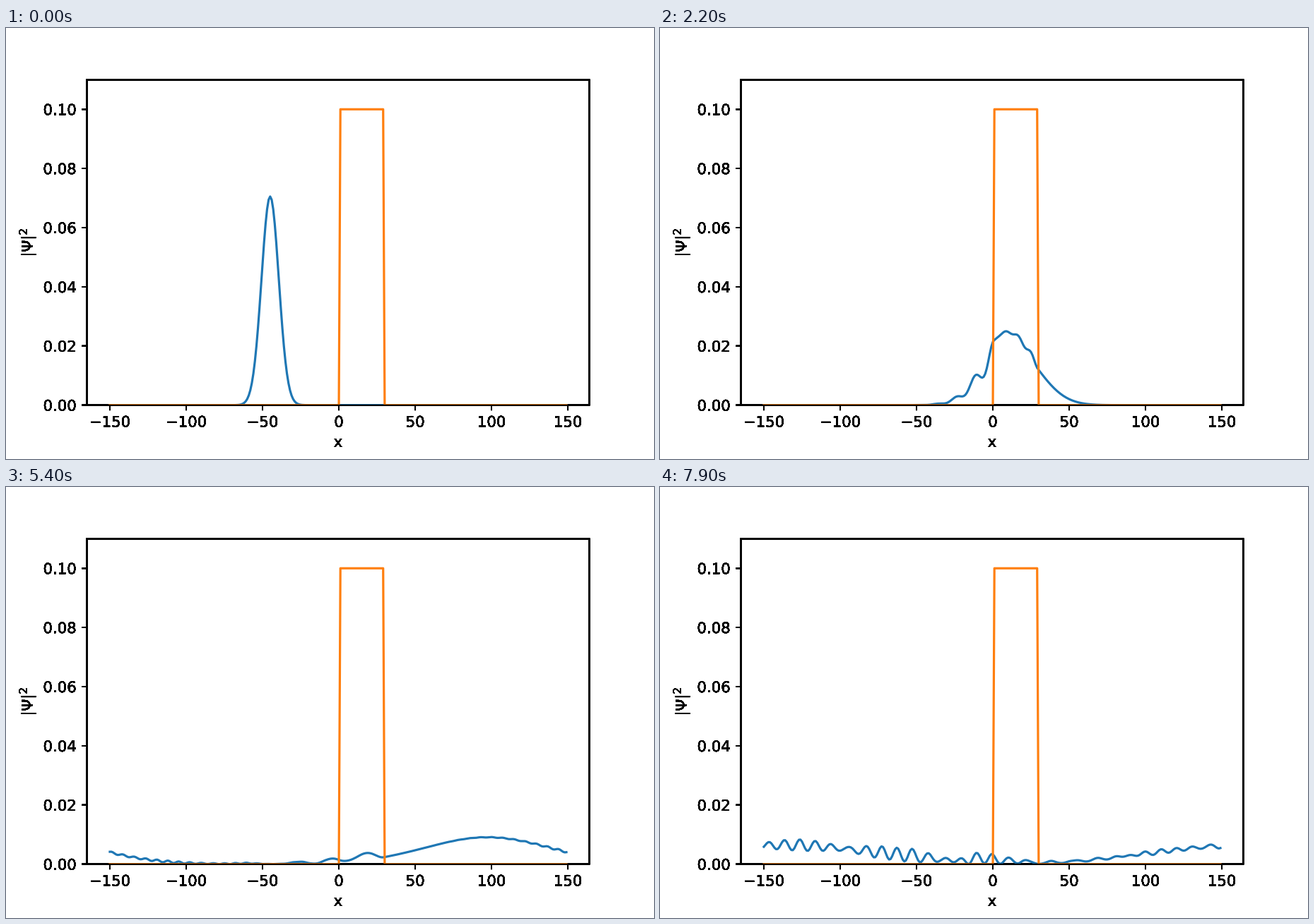
Recreate the animation shown at these times as a matplotlib script. Size 917 by 611 pixels, loop 8 s.

```python
import numpy as np
import matplotlib.pyplot as plt
from matplotlib.animation import FuncAnimation
from matplotlib.patches import Rectangle
from matplotlib.patheffects import Stroke

W, H = 917, 611
DPI = W / 6
FRAMES, INTERVAL = 80, 100

# Wave packet and barrier, in units where hbar = m = 1
X0, WIDTH, K0 = -45, 8, np.pi / 10
HEIGHT = 0.0118
DT = 8.45

plt.rcParams.update({
    "font.family": "DejaVu Sans",
    "font.size": 10,
    "path.snap": False,
})

x = np.arange(-150, 150)
inside = (x > 0) & (x < 30)


def hamiltonian():
    """Spectral kinetic energy on a periodic grid plus the barrier."""
    k = 2 * np.pi * np.fft.fftfreq(x.size)
    waves = np.fft.fft(np.eye(x.size), axis=0)
    kinetic = np.fft.ifft(k[:, None] ** 2 / 2 * waves, axis=0).real
    return (kinetic + kinetic.T) / 2 + np.diag(HEIGHT * inside)


psi0 = np.exp(-(x - X0) ** 2 / (2 * WIDTH ** 2) + 1j * K0 * x)
psi0 /= np.linalg.norm(psi0)
energy, modes = np.linalg.eigh(hamiltonian())
coef = modes.T @ psi0


def density(t):
    return np.abs(modes @ (coef * np.exp(-1j * energy * t))) ** 2


def harden(img, dpi):
    """Turn soft edges nearly solid."""
    img = img.copy()
    img[..., 3] = np.clip(img[..., 3] * 8, 0, 1)
    return img, 0, 0


fig = plt.figure(figsize=((W + 0.01) / DPI, (H + 0.01) / DPI), dpi=DPI,
                 facecolor="white")
ax = fig.add_axes([0.125, 0.125, 0.775, 0.755])
wave, = ax.plot(x, density(0), color="#1f77b4", lw=1.5)
ax.plot(x, 0.1 * inside, color="#ff7f0e", lw=1.5)
ax.set_xlim(-164.95, 163.95)
ax.set_ylim(0, 0.11)
ax.set_xlabel("x")
ax.set_ylabel(r"$|\Psi|^2$", labelpad=3)

# Everything outside the plot area has hard edges: the axes and the outer rim
ax.add_patch(Rectangle((0, 0), 1, 1, transform=ax.transAxes, fill=False,
                       ec="black", lw=0.8, clip_on=False, zorder=0.5,
                       agg_filter=harden))
for axis in (ax.xaxis, ax.yaxis):
    axis.set_agg_filter(harden)
    for part in [*axis.get_ticklabels(), *axis.get_ticklines(), axis.label]:
        part.set_path_effects([Stroke(snap=False)])


def update(i):
    wave.set_ydata(density(i * DT))
    return wave,


anim = FuncAnimation(fig, update, frames=FRAMES, interval=INTERVAL,
                     repeat=True, repeat_delay=0)
plt.show()
```
